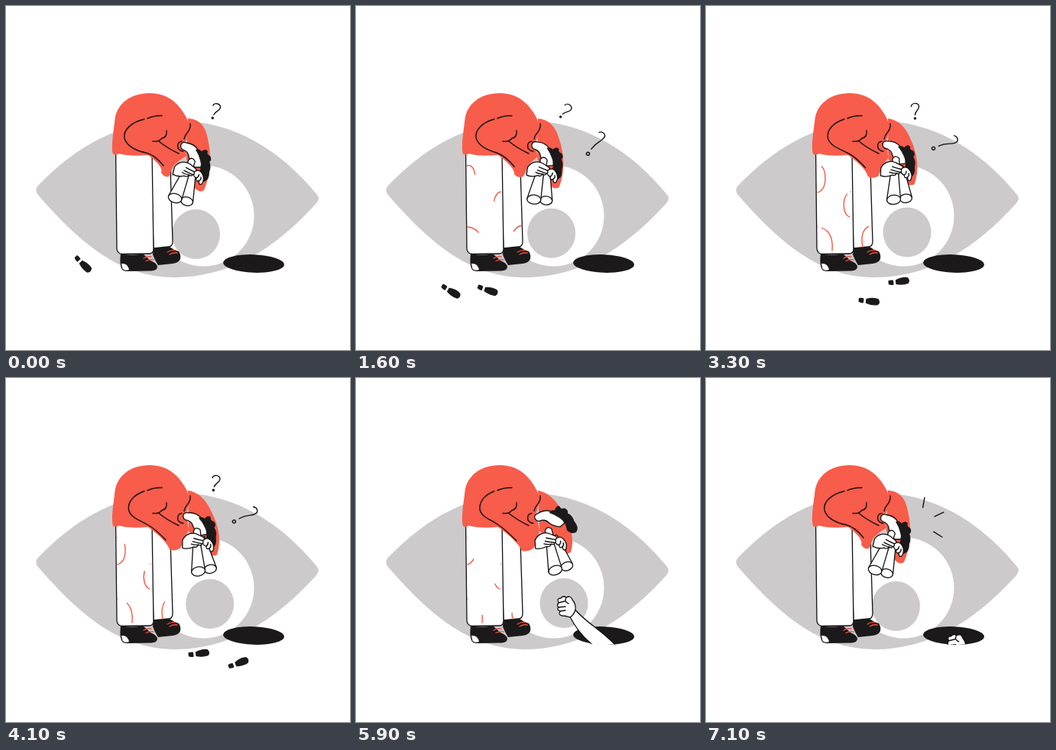
Animation of 450x450 px, one loop 7.2 s. Source, as an HTML page:

```html
<!DOCTYPE html>
<html lang="en">
<head>
<meta charset="utf-8">
<title>Looking for clues</title>
<style>
html, body { margin: 0; width: 100%; height: 100%; overflow: hidden; background: #fff; }
svg { display: block; width: 100vw; height: 100vh; }
.ink { fill: none; stroke: #111; stroke-width: 1.4; stroke-linecap: round; stroke-linejoin: round; }
.skin { fill: #fff; stroke: #111; stroke-width: 1.3; stroke-linecap: round; stroke-linejoin: round; }
.red { fill: #f85c4a; }
.dark { fill: #1b191a; }
.grey { fill: #cccacb; }
.fold { fill: none; stroke: #f2513f; stroke-width: 1.3; stroke-linecap: round; }
</style>
</head>
<body>
<svg viewBox="0 0 450 450">
  <defs>
    <clipPath id="mouth">
      <path d="M200,200H400V338H364C364,345 346,349 324,349C302,349 284,344 284,336H200Z"/>
    </clipPath>
  </defs>

  <path class="grey" d="M41,236C90,184 150,150 222,150C300,150 360,190 407,247Q411,252 406,258C350,320 290,355 220,355C150,355 97,311 41,246Q38,241 41,236Z"/>
  <circle cx="258.500" cy="274.500" r="66" fill="#fff"/>
  <ellipse id="pupil" class="grey" rx="31.500" ry="32.500"/>

  <g id="prints" class="dark"></g>
  <ellipse class="dark" cx="324" cy="337" rx="40" ry="11.800" transform="rotate(2 324 337)"/>
  <g clip-path="url(#mouth)">
    <g id="grab">
      <path class="skin" d="M285,301C296,316 318,328 337,347L400,400H360L306,346C295,337 286,324 279,311Z"/>
      <path class="skin" d="M265,294Q262,288 268,288Q271,284 275,287Q281,284 283,290Q288,296 287,303Q285,310 280,313Q274,311 270,311Q264,310 267,305Q262,303 265,300Q262,298 265,294Z"/>
      <path class="ink" d="M265,294L273,292M265,300L274,299M267,305L274,304M275,287Q272,293 278,295"/>
    </g>
  </g>

  <path id="farSleeve" class="red"/>

  <path class="skin" d="M188,180H214L218,308Q218,315 212,315L193,317Z"/>
  <path class="skin" d="M143.500,186L145,318Q146,324 152,324.500L187,324Q193,324 193,318L191,190Z"/>
  <g id="folds" class="fold"></g>

  <path class="dark" d="M193,317L214,315Q219,319 226,321Q229,325 228,331Q226,336 218,337L199,339Q194,331 192,325Z"/>
  <path class="dark" d="M150,324C149,332 149,340 152,345Q154,347 160,347L190,346.500Q198,346 198,341Q197,336 189,333L179,324Q165,327 150,324Z"/>
  <path fill="#fff" d="M151,337Q159,336 161,345Q156,347 152.500,344Z"/>
  <path class="fold" d="M180,330Q185,327 190,328M183,333.500Q188,331 193,332M211,322Q216,319 221,319.500M214,325Q219,322 224,323"/>

  <path class="red" d="M140,193.500C137,185 141,162 142.500,148C145,128 163,114 188,114C212,114 227,128 237,148C241,160 239,172 233,181L228,196L206,211Q197,200 186,195Q160,197 148,193Q143,196 140,193.500Z"/>
  <path id="nearSleeve" class="red"/>
  <path class="ink" d="M204,143.500Q194,143 185,147"/>
  <path id="armLine" class="ink"/>
  <path class="ink" d="M192,177Q200,178 204,173Q211,172 210,163M200,177Q211,186 226,193"/>
  <path class="ink" d="M241,154Q242,160 237,166Q234,169 233,174M230,177Q223,178 225,186Q228,190 232,190"/>

  <g id="head">
    <path class="skin" d="M229,181Q231,177 236,179Q246,180 251,188Q258,198 255,211L247,211Q241,206 239,197Q239,192 234,189Q227,187 229,181Z"/>
    <path class="dark" d="M248,188Q252,186 256,190Q261,186 264,190Q262,194 267,196Q270,201 266,204Q269,210 266,217Q266,228 259,230Q252,229 251,220Q257,211 254,202Q252,194 248,188Z"/>
  </g>

  <g id="glass" class="skin">
    <path d="M-4,-6Q0,-12 5,-6L4,8H-4Z"/>
    <path d="M2,4L0,46A8,6 0 0 0 16,46L9,4Z"/>
    <ellipse cx="8" cy="47" rx="8" ry="5.600"/>
    <path d="M-6,4L-17,46A9,6 0 0 0 1,46L2,4Z"/>
    <ellipse cx="-8" cy="47" rx="9" ry="6"/>
  </g>
  <g id="hands">
    <path class="skin" d="M6,8Q13,3 17,9Q22,16 18,23Q14,25 14,19Q10,21 10,16Q5,14 6,8Z"/>
    <path class="ink" d="M10,16Q13,14 13,11M14,19Q17,17 16,14"/>
    <path class="skin" d="M-20,5C-16,-2 -8,-5 0,-1L8,4Q10,7 6,8Q8,11 5,12Q4,15 0,13Q-2,17 -6,15Q-14,18 -21,15Z"/>
    <path class="ink" d="M6,8Q0,6 -5,4M5,12Q-2,10 -7,8M0,13Q-5,13 -9,11"/>
  </g>

  <g id="ask1" class="ink">
    <path d="M-5,-6C-5,-11 5,-12 5,-6C5,-1 0,0 0,5"/><circle cy="9.500" r="1"/>
  </g>
  <g id="ask2" class="ink">
    <path d="M-4,-14C-1,-18 6,-17 5,-11C5,-5 0,-2 0,10"/><circle cy="17.500" r="2"/>
  </g>
  <g id="alarm" class="ink"></g>
</svg>
<script>
const LOOP = 7200, STEP = 100, PACE = 730;
const $ = id => document.getElementById(id);
const set = (el, attrs) => { for (const k in attrs) el.setAttribute(k, attrs[k]); };
const show = (el, on) => set(el, { visibility: on ? 'visible' : 'hidden' });
const lerp = (a, b, p) => a + (b - a) * p;
const linear = (t, a, b) => Math.min(1, Math.max(0, (t - a) / (b - a)));
const ease = (t, a, b) => { const u = linear(t, a, b); return u * u * (3 - 2 * u); };

function add(parent, tag, attrs = {}) {
  const el = document.createElementNS('http://www.w3.org/2000/svg', tag);
  set(el, attrs);
  return parent.appendChild(el);
}

// Blend two path strings of the same structure
function mix(a, b, p) {
  const to = b.match(/-?[\d.]+/g);
  let i = 0;
  return a.replace(/-?[\d.]+/g, n => lerp(+n, +to[i++], p).toFixed(2));
}

// The trail bends from downhill to uphill, one shoe per step
const prints = [[99, 336], [122, 372], [170, 371], [211, 386], [250, 361], [302, 374], [345, 347]]
  .map(([x, y], i) => add($('prints'), 'path', {
    d: 'M-12,-3Q-8,-4 -5,-3L-5,3Q-8,4 -12,2ZM-2,-3Q8,-7 15,-4.5Q19,0 15,4Q7,6 -2,3Z',
    transform: `translate(${x} ${y}) rotate(${45 - 13 * i}) scale(.95)`
  }));

const folds = [
  'M145,209C151,206 156,214 156,225C156,236 152,242 146,244',
  'M189,243C178,246 177,272 188,276',
  'M146,289C158,290 167,300 165,320',
  'M217,287C206,289 202,300 205,316'
].map(d => add($('folds'), 'path', { d, pathLength: 100 }));

const rays = [-80, -25, 32].map(deg =>
  add($('alarm'), 'line', { x1: 21, transform: `translate(280 190) rotate(${deg})` }));

// Poses looking straight down and looking ahead
const poses = {
  farSleeve: [
    'M238,147C252,148 261,156 264,174C269,195 268,220 259,241Q253,245 247,238L236,200Z',
    'M238,147C252,150 262,160 270,175C282,195 286,212 281,228Q276,232 268,225L240,200Z'],
  nearSleeve: [
    'M170,165L234,168L236,196Q226,202 219,209L213,223Q207,225 203,218Q206,210 186,195Z',
    'M170,165L234,168L240,200Q238,206 237,213L233,222Q225,228 217,226Q211,213 186,195Z'],
  armLine: [
    'M181,148C164,152 153,162 155,173C158,184 172,190 183,192C192,194 199,200 206,209',
    'M181,148C168,153 161,162 162,172C164,182 176,185 186,192C194,197 202,205 210,213']
};

function draw(t) {
  const lean = linear(t, 0, 5300) - ease(t, 6100, 7100);
  const lift = ease(t, 5200, 5800) - ease(t, 6200, 6600);
  const out = ease(t, 5200, 5850) - ease(t, 6400, 7200);

  set($('pupil'), { cx: lerp(248.5, 272, lean), cy: lerp(298.5, 294.5, lean) });
  for (const id in poses) set($(id), { d: mix(...poses[id], lean) });

  set($('head'), { transform: `translate(${4 * lean} ${-4 * lean}) rotate(${-13 * lean - 27 * lift} 238 183)` });
  const hold = `translate(${lerp(241, 253, lean)} ${lerp(208, 204.5, lean)})`;
  const turn = lerp(15, -19, lean);
  set($('glass'), { transform: `${hold} rotate(${turn})` });
  set($('hands'), { transform: `${hold} rotate(${turn / 2})` });

  prints.forEach((p, i) => show(p, t >= i * PACE && t < (i + 2) * PACE));
  show($('grab'), out > 0);
  set($('grab'), { transform: `translate(${55 * (1 - out)} ${52 * (1 - out)})` });

  // Creases draw themselves in, then run off their far ends
  const tail = 100 * linear(t, 2700, 6900), tip = 100 * linear(t, 500, 3300);
  for (const f of folds) {
    show(f, tip > tail);
    set(f, { 'stroke-dasharray': `0 ${tail} ${Math.max(0, tip - tail)} 200` });
  }

  const tilt1 = 20 + 18 * ease(t, 0, 1600) - 38 * ease(t, 1600, 3300) + 20 * ease(t, 3300, 4600);
  show($('ask1'), t < 4600);
  set($('ask1'), { transform: `translate(273.5 137.5) rotate(${tilt1})` });
  const tilt2 = 62 - 27 * ease(t, 500, 1600) + 31 * ease(t, 1600, 3400) - 15 * ease(t, 3400, 5000);
  const grow = linear(t, 400, 700) - linear(t, 5300, 5500);
  show($('ask2'), grow > 0);
  set($('ask2'), { transform: `translate(313.5 179) rotate(${tilt2}) scale(${grow})` });

  const burst = linear(t, 6100, 6400);
  show($('alarm'), burst > 0);
  for (const r of rays) set(r, { x2: 21 + 13 * burst });
}

const start = performance.now();
function tick() {
  const t = (performance.now() - start) % LOOP;
  draw(Math.floor(t / STEP) * STEP);
  requestAnimationFrame(tick);
}
tick();
</script>
</body>
</html>
```
